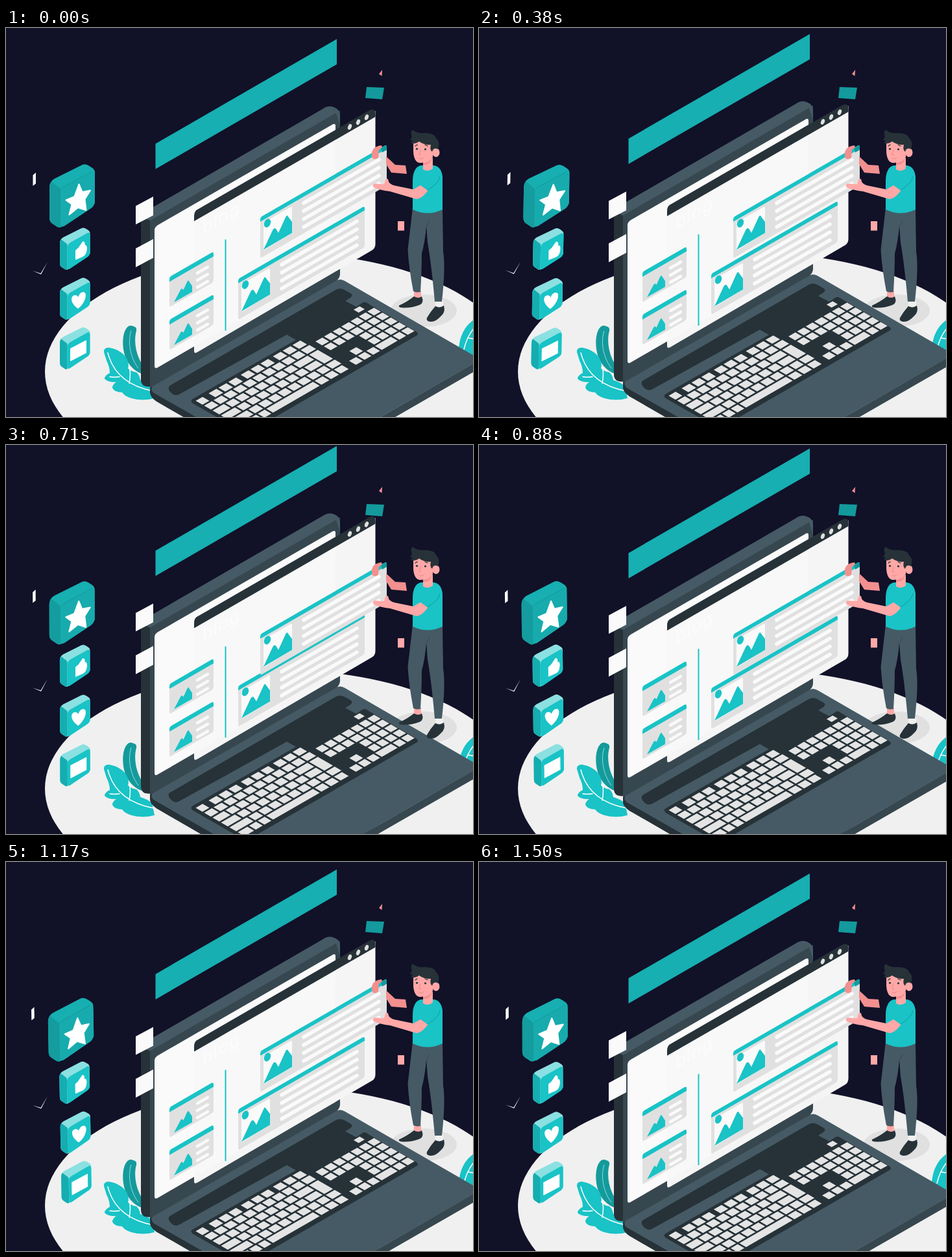
An HTML page for the animation above (1540 ms loop, 720 px wide and 600 px high).

```html
<!DOCTYPE html>
<html lang="en">
<head>
<meta charset="utf-8">
<title>Blog layout</title>
<style>
html, body { margin: 0; width: 100%; height: 100%; overflow: hidden; background: #111128; }
svg { display: block; width: 720px; height: 600px; }
text { font-family: Roboto, "Open Sans", sans-serif; }
</style>
</head>
<body>
<svg viewBox="0 0 720 600" xmlns="http://www.w3.org/2000/svg">
  <rect width="720" height="600" fill="#111128"/>
  <ellipse cx="424" cy="530" rx="364" ry="183" fill="#f0f0f0"/>
  <ellipse cx="644" cy="436" rx="51" ry="25" fill="#e0e0e0"/>

  <g id="plants">
    <path fill="#159a9c" d="M196 460C186 455 179 471 180.500 491C182 512 194 528 209 533L211 521C199 502 197 481 201 467Q202 461 196 460Z"/>
    <path fill="none" stroke="#8be0e1" d="M193 467C188 482 190 506 204 525"/>
    <path fill="#19c3c6" d="M151 500Q150 493 159 493C172 495 184 503 187 512Q190 519 188 525Q193 530 201 531Q206 535 207 543Q217 546 225 552L229 571Q211 576 193 571Q183 568 179 562Q167 562 164 555Q164 550 170 546Q157 547 152 541Q152 536 160 532Q160 523 155 513Z"/>
    <g fill="none" stroke="#fff" stroke-width="1.500" stroke-linecap="round">
      <path d="M157 501C163 525 180 551 227 560M175 538Q166 539 160 538M190 548Q193 533 190 521"/>
    </g>
    <path fill="#19c3c6" d="M698 494C700 473 708 458 724 448V520Z"/>
    <path fill="none" stroke="#fff" stroke-width="1.600" d="M706 496Q711 474 724 460M712 478L724 480"/>
  </g>

  <g id="icons"></g>

  <g fill="#149a9c">
    <path d="M556 91L583 92L580 110L554 108Z"/>
    <path fill="#f28f8f" d="M575 71L580 64.500L579.500 74Z"/>
    <path fill="#ffa8a7" d="M604 298H614V312.500H604Z"/>
  </g>

  <g id="laptop">
    <path fill="#17afb1" d="M230.500 178.500L510 17V56L230.500 217.500Z"/>

    <!-- base -->
    <path fill="#263238" d="M222 550V563Q223 570 232 576L360 650H500L700 520L515 388Z"/>
    <path fill="#37474f" d="M500 645L728 513L732 510V521Q732 524 728 526.500L515 649Z"/>
    <path fill="#455a64" d="M226 552L508 390Q515 386 522 390L728 509Q733 511.500 728 513.500L500 645H372L228 563Q222 558 226 552Z"/>
    <path fill="#263238" d="M252 552L508 404Q515 400 522 404L531 409Q536 412 531 416L523 421L540 430L549 424Q553 421 558 425L632 468Q638 472 632 475L370 626L288 579Q283 575 288 572L447 481L433 473L267 565Q261 568 256 564Q248 557 252 552Z"/>
    <g id="keys"></g>

    <!-- lid -->
    <path fill="#263238" d="M208 292L224 284V553Q208 555 208 542Z"/>
    <path fill="#37474f" d="M222 296L515 127V379Q515 385 510 389.500L222 555Z"/>
    <path fill="#455a64" d="M208 291Q210 286 216 282.500L488 125Q495 120 502 121Q515 124 515 135V151L509 131L222 297Z"/>
    <path fill="#fafafa" d="M229 312Q229 307 234 304L503 149Q508 146 508 151V365L235 523Q229 527 229 521Z"/>

    <!-- page window -->
    <path fill="#f5f5f5" d="M290 290L569.500 128V333Q569.500 340 564 343L295 500Q290 503 290 498Z"/>
    <path fill="#f8f8f8" d="M290 298L508 172V365L290 491Z"/>
    <path fill="#263238" d="M290 298V290Q290 282 296 279.500L560 127Q569.500 122 569.500 133V137Z"/>
    <g id="dots" fill="#e0e0e0"></g>
    <text transform="matrix(1 -.577 0 1 303 319)" font-size="28" letter-spacing=".9" fill="#fcfcfc">blog</text>
    <g id="side"></g>
    <path stroke="#19c3c6" stroke-width="2" stroke-linecap="round" d="M338.500 327V466"/>
    <g id="lower"></g>
    <path fill="#fafafa" d="M200 274.500L227 260V289L200 303ZM200 340L227 325.500V354.500L200 369Z"/>
  </g>

  <g id="held" transform="translate(34 -95)"></g>

  <g id="man">
    <path fill="#149a9c" d="M578 186L585 181Q587 180 587 184V188L580 192Z"/>
    <path fill="#f28f8f" d="M566 187Q570 182 579 181L580 184L575 188L574 200Q570 204 565 201Q562 194 566 187Z"/>
    <path fill="#f28f8f" d="M586 198L600 211L616 212L618 225L594 223L586 210Z"/>
    <path fill="#ffa8a7" d="M629 405H640V416H629Z"/>
    <path fill="#f0f0f0" d="M662 419H674V432H662Z"/>
    <path fill="#263238" d="M606 428Q619 422 629 414Q636 418 641 414Q645 424 638 427Q622 433 608 431Q605 430 606 428Z"/>
    <path fill="#263238" d="M649 447Q654 438 662 429Q669 433 675 428Q678 438 671 444Q662 454 654 453Q647 452 649 447Z"/>
    <path fill="#455a64" d="M627 277L673 278L674 345Q678 368 672 422H661Q656 365 650 331L648 305Q646 330 641 348Q641 375 639 407Q633 409 628 406Q621 370 619.500 342Z"/>
    <path fill="none" stroke="#37474f" d="M648 306L653 297"/>
    <path fill="#19c3c6" d="M640 212C632 213 627 222 627 236V280Q650 291 673 280V229Q671 214 660 212Z"/>
    <path fill="#ffa8a7" d="M643 203V218Q650 223 658 217V200Z"/>
    <path fill="#f28f8f" d="M643 208Q651 208 657 201Q654 212 643 211Z"/>
    <path fill="#ffa8a7" d="M628 174V191Q629 206 637 208Q650 209 658 199L661 172L645 166Z"/>
    <ellipse cx="663" cy="192" rx="5.500" ry="7" fill="#ffa8a7"/>
    <path fill="#263238" d="M622 172Q627 171 625 164Q624 159 627 157Q633 163 645 162Q661 162 663 170Q670 175 666 187Q659 183 657 191Q653 188 655 180Q645 181 637 175Q631 180 624 177L627 174Z"/>
    <g fill="#263238">
      <circle cx="633.500" cy="186.500" r="1.600"/>
      <circle cx="646.500" cy="187" r="1.600"/>
    </g>
    <g fill="none" stroke="#263238" stroke-width="1.300" stroke-linecap="round">
      <path d="M631 182L634 180M646 180L650 182"/>
      <path stroke="#f28f8f" d="M639 188L637 195L640 196M637 201Q641 203 644 200"/>
    </g>
    <path fill="#ffa8a7" d="M640 242L651 250Q642 263 633 264L592 252Q576 250 567 246Q564 242 568 240L583 241L585 234Q589 230 590 237Q592 241 599 243L628 249Z"/>
    <path fill="#19c3c6" d="M637 241L652 252L671 237V222L655 222Z"/>
    <path fill="none" stroke="#129ea1" d="M650 250Q668 239 669 229"/>
  </g>
</svg>
<script>
const $ = id => document.getElementById(id);
const TEAL = "#19c3c6", SLOPE = 0.577;
const path = (d, fill) => `<path d="${d}" fill="${fill}"/>`;

// slanted line running up to the right
const line = (x, y, w, thick) =>
  `<path d="M${x} ${y}l${w} ${-w * SLOPE}" stroke="#fafafa" stroke-width="${thick}" stroke-linecap="round"/>`;

const panel = (x, y, w, h, bar) => {
  const r = w * SLOPE;
  return path(`M${x} ${y + 5}L${x + w} ${y + 5 - r}V${y + h - r - 3}q0 3 -3 4.700L${x + 3} ${y + h - 2}q-3 2 -3 -2Z`, "#e0e0e0") +
    path(`M${x} ${y + bar}V${y + 4}q0 -4 3 -5.700L${x + w - 3} ${y - r + 1.700}q3 -1.500 3 2V${y + bar - r}Z`, TEAL);
};

const sideCard = y => `<g transform="translate(0 ${y})">` + panel(252, 384, 68, 47, 7.5) +
  path("M259 423L269 404Q271 400 273.500 404L279 392Q281 387 283 392L287 398V407Z", TEAL) +
  [378, 389, 400].map(v => line(295, v, 16, 4.5)).join("") + "</g>";

const postCard = () => panel(358, 387, 195, 63.500, 6.8) +
  path("M363 395L405 371Q407 370 407 373V411L365 437Q363 438 363 435Z", "#fafafa") +
  `<ellipse cx="369" cy="396" rx="4.800" ry="7" transform="rotate(25 369 396)" fill="${TEAL}"/>` +
  path("M363 437L377 407Q380 401 383 406L386 411L397 387Q399 382 401 386L407 394V411Z", TEAL) +
  [0, 1, 2, 3].map(i => line(425, 365 + i * 12.3, 116, 5.6)).join("");

$("side").innerHTML = sideCard(0) + sideCard(66);
$("lower").innerHTML = $("held").innerHTML = postCard();
$("dots").innerHTML = [0, 1, 2].map(i => {
  const x = 530 + i * 13, y = 152.500 - i * 7.4;
  return `<ellipse cx="${x}" cy="${y}" rx="2.800" ry="4.500" transform="rotate(22 ${x} ${y})"/>`;
}).join("");

// keyboard: a runs along a row, b counts rows
const at = (a, b) => `${(303 + 13.3 * a + 13 * b).toFixed(1)} ${(575 - 7.68 * a + 7.5 * b).toFixed(1)}`;
const key = (a, b, w = 1, h = 1) => {
  const l = a - 0.4, r = a + w - 0.6, t = b - 0.4, e = b + h - 0.6;
  return `M${at(l, t)}L${at(r, t)}L${at(r, e)}L${at(l, e)}Z`;
};
const caps = [key(0, 0)];
for (let i = 0; i < 9; i++) caps.push(key(1.5 + i * 1.14 + Math.floor(i / 3) * 0.3, 0, 1.1));

const STEP_A = 1.12, ROW_END = 12.4;
[1.1, 1.5, 1.8, 2.2].forEach((w, i) => {
  const b = i + 1, end = b === 2 || b === 3 ? 11.2 : ROW_END;
  caps.push(key(0, b, w));
  let a = w;
  for (; a + 2 * STEP_A <= end; a += STEP_A) caps.push(key(a, b, STEP_A));
  caps.push(key(a, b, end - a));
});
caps.push(key(11.2, 2, 1.2, 2));
caps.push(key(0, 5, 1.3), key(1.3, 5), key(2.3, 5), key(3.3, 5, 5.6));
for (let a = 8.9; a < 12; a += STEP_A) caps.push(key(a, 5, STEP_A));
for (let a = 12.9; a < 16; a++) caps.push(key(a, 1), key(a, 2), key(a, 5));
caps.push(key(13.9, 4), key(18.3, 0, 0.9, 0.8));
for (let b = 1; b < 6; b++)
  for (let c = 0; c < 4; c++)
    if (!(b === 5 && c === 1)) caps.push(key(16 + c * 0.97, b, b === 5 && c === 0 ? 1.94 : 0.98));
$("keys").innerHTML = path(caps.join(""), "#e4e4e4");

// rounded iso tile with its corner at 0,0
const tile = (x, y, scale, side, top, front) =>
  `<g transform="translate(${x} ${y}) scale(${scale})">` +
  path("M0 24Q0 18 5 15L33 1Q37 -1 41 2L44 4Q47 6 46.500 10V40L13 64Q10 66 6 63L3 61Q0 59 0 55Z", top) +
  path("M0 24Q0 20 2 18L11 25Q12 27 11.500 30V61Q12 65 10 65Q8 65 6 63L3 61Q0 59 0 55Z", side) +
  path("M11.500 31Q11.500 26 16 23L42 8.500Q46.500 6 46.500 12V38Q46.500 42 43 45L16 63Q11.500 66 11.500 60Z", front) + "</g>";
const small = y => tile(83, y, 1, "#15adb0", "#8be0e1", TEAL);

$("icons").innerHTML =
  tile(67, 210, 1.505, "#149c9e", "#17afb1", "#17abad") + small(308) + small(385) + small(461.5) +
  `<path d="M85 249Q87 246 91 244L133 221" fill="none" stroke="#149c9e"/>
  <g fill="#fff" stroke="#fff" stroke-linejoin="round">
    <path stroke-width="2" d="M112.500 241L117.500 253L130 250.500L121.500 264L123.500 281L111 277L97.500 288L101.500 272L92.500 265.500L105.500 260Z"/>
    <path d="M107.500 343L112 339L118.500 329.500Q122 329 121 335.500L123.500 335.500Q125.500 339 123.500 346Q122 351 118 352.500L107.500 357Z"/>
    <path stroke="none" d="M111 433C104 428 99.500 421 101.500 415.500C104 411 109 411 111.500 415C113 408 120 405 122.500 409.500C124.500 417 118 428 111 433Z"/>
    <path d="M99.500 494.500L123.500 482V501L99.500 513.500Z"/>
    <path stroke="none" d="M41.500 227L46 223V240L41.500 243.500Z"/>
    <path stroke="none" d="M41 374.500L53.500 378.500L64 361L54 380Z"/>
  </g>`;

const lift = [[0, 0], [3, -2.4], [9, -7.8], [17, -15.4], [24, -9.2], [28, -5.6], [33, -1.2], [35, 0.4], [36, 0.8]];
const sway = [[0, 0], [3, 0.4], [8, 1], [10, 1], [17, -0.12], [23, -0.95], [26, -1.06], [28, -1], [36, -0.12]];
function track(points, n) {
  const i = Math.max(1, points.findIndex(p => p[0] >= n));
  const [a, v] = points[i - 1], [b, w] = points[i];
  return v + (w - v) * (n - a) / (b - a);
}

const LOOP = 1540, STEP = 1000 / 24;
function draw(ms) {
  const n = Math.min(36, Math.floor((ms % LOOP + 4.9) / STEP));
  $("laptop").setAttribute("transform", `translate(0 ${track(lift, n).toFixed(3)})`);
  $("icons").setAttribute("transform", `rotate(${track(sway, n).toFixed(3)} 89 368)`);
}
const start = performance.now();
function tick() {
  draw(performance.now() - start);
  requestAnimationFrame(tick);
}
tick();
</script>
</body>
</html>
```
